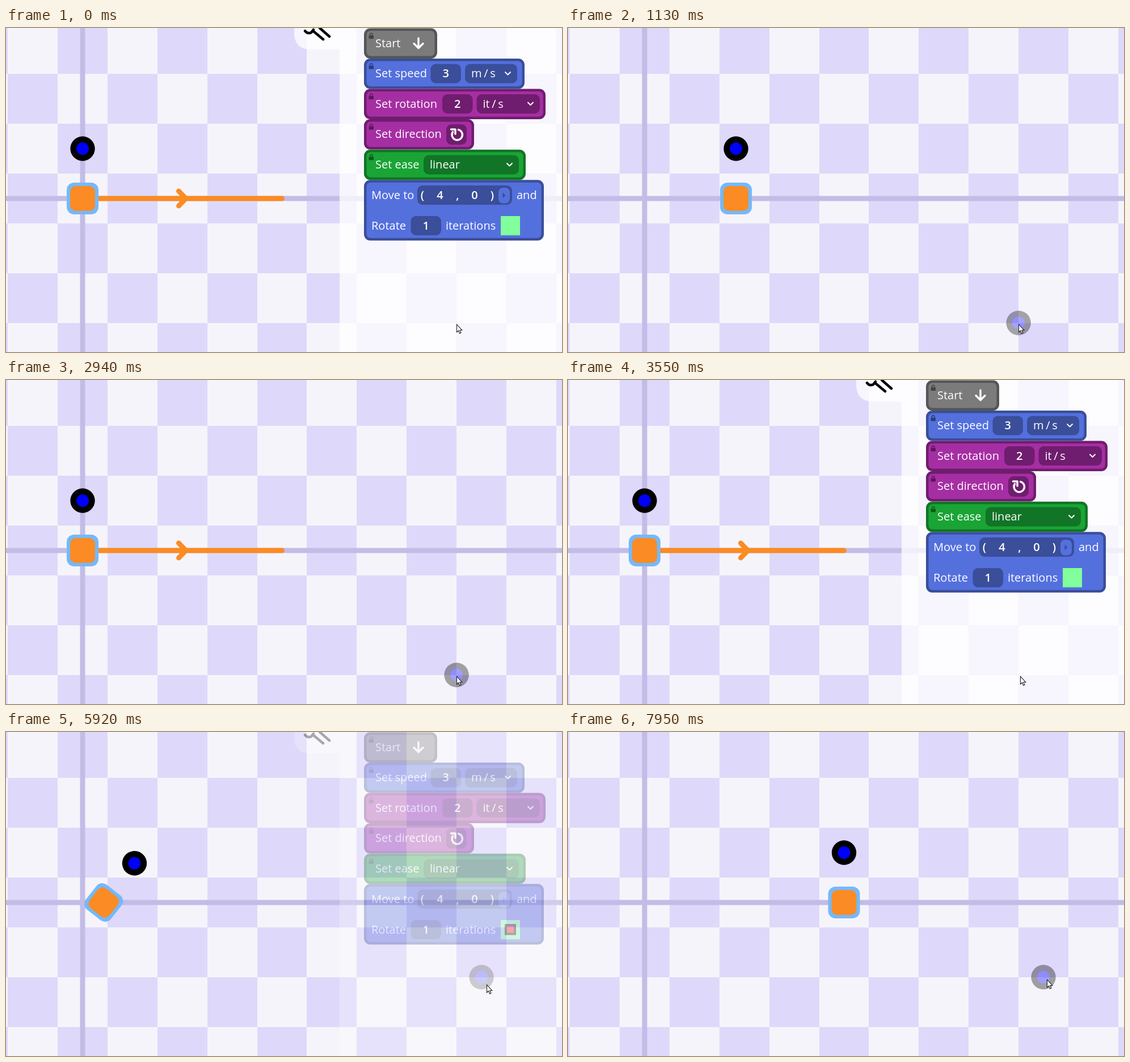
An HTML page for the animation above (8 s loop, 980 by 572 pixels).

```html
<!DOCTYPE html>
<html lang="en">
<head>
<meta charset="utf-8">
<title>Move and rotate</title>
<style>
  html, body { margin: 0; width: 100%; height: 100%; overflow: hidden; background: #f6f4fb; }
  svg { display: block; width: 980px; height: 572px; }
  text { font: 500 20px "Open Sans", "Noto Sans", sans-serif; fill: #fff; white-space: pre; }
  .num { font-weight: 600; text-anchor: middle; }
  .unit { word-spacing: -1.5px; }
  .line { fill: none; stroke: #fff; stroke-linecap: round; stroke-linejoin: round; }
</style>
</head>
<body>
<svg id="stage" viewBox="0 0 980 572">
  <g id="grid" shape-rendering="crispEdges"></g>
  <path d="M135 0V572M0 301H980" stroke="#c2bde6" stroke-width="9"/>
  <g id="arrow" class="line" style="stroke:#fb8b24" stroke-width="9">
    <path d="M135 301H486.5M304.5 288L317 301L304.5 314"/>
  </g>
  <g id="body">
    <rect x="-28" y="-28" width="56" height="56" rx="13" fill="#74b9fb"/>
    <rect x="-22" y="-22" width="44" height="44" rx="10" fill="#fb8b24"/>
    <g id="dot" transform="translate(0 -88)">
      <circle r="21.7" fill="#000"/>
      <circle r="11" fill="#00f"/>
    </g>
  </g>
  <g id="ghost">
    <circle r="21.7" fill="#000"/>
    <circle r="11" fill="#00f"/>
  </g>
  <g id="panel">
    <path d="M508 0H588V38H534Q508 36 508 8Z" fill="#fff" fill-opacity=".75"/>
    <rect x="588" width="392" height="572" fill="#fff" fill-opacity=".75"/>
    <path class="line" style="stroke:#000" stroke-width="4.5"
      d="M527 5Q531 11 538 8L542 3M541 5L559 20M553 0L570 15"/>
    <g id="blocks"></g>
    <g id="mark">
      <rect x="879" y="339" width="20" height="19.5" fill="#000"/>
      <rect x="883" y="343" width="12" height="11.5" fill="#f00"/>
    </g>
  </g>
  <path id="cursor" d="M.5 .5V14L3.5 11.3L5.6 16.3L7.9 15.3L5.8 10.5H9.8Z" fill="#fff" stroke="#222" stroke-width="1.1"/>
</svg>
<script>
const NS = 'http://www.w3.org/2000/svg';
const LOOP = 8000, CELL = 87.88, OX = 135, OY = 301;
const $ = id => document.getElementById(id);

function add(parent, tag, attrs, label) {
  const el = document.createElementNS(NS, tag);
  for (const k in attrs) el.setAttribute(k, attrs[k]);
  if (label) el.textContent = label;
  return parent.appendChild(el);
}

// Checkerboard centred on the origin cell
for (let i = -2; i <= 10; i++)
  for (let j = -4; j <= 4; j++)
    if ((i + j) & 1)
      add($('grid'), 'rect', {
        x: OX + (i - .5) * CELL, y: OY + (j - .5) * CELL,
        width: CELL, height: CELL, fill: '#ded9fa'
      });

// Code blocks
const blocks = $('blocks');
const GREY = ['#7b7b7b', '#555555'], BLUE = ['#5470dd', '#3a4e99'],
      PINK = ['#a62ea3', '#6f1d6e'], GREEN = ['#1aa435', '#117426'];

const text = (x, y, s, cls = '') => add(blocks, 'text', { x, y, class: cls }, s);
const stroke = (d, w) => add(blocks, 'path', { d, class: 'line', 'stroke-width': w });
const box = (x, y, width, height, rx, fill) =>
  add(blocks, 'rect', { x, y, width, height, rx, fill });

function block(y, w, h, [fill, edge]) {
  box(631, y, w, h, 11, edge);
  box(635.5, y + 4.5, w - 9, h - 9, 7, fill);
}

function lock(y) {
  const g = add(blocks, 'g', { opacity: .45 });
  add(g, 'rect', { x: 639.5, y: y + 4.5, width: 8.5, height: 6, rx: 1, fill: '#000' });
  add(g, 'path', {
    d: `M641.5 ${y + 5}v-2a2.2 2.2 0 0 1 4.5 0v2`,
    fill: 'none', stroke: '#000', 'stroke-width': 1.4
  });
}

function row(y, w, colors, label) {
  block(y, w, 53.5, colors);
  lock(y + 8);
  text(651, y + 33, label);
}

const field = (x, y, w, colors) => box(x, y, w, 34, 9, colors[1]);

function number(x, y, s, colors) {
  field(x, y, 53.5, colors);
  text(x + 26.7, y + 23.5, s, 'num');
}

function select(x, y, w, s, colors, pad = 11) {
  field(x, y, w, colors);
  text(x + pad, y + 23.5, s, 'unit');
  stroke(`M${x + w - 21} ${y + 14.5}l4.5 4.5l4.5 -4.5`, 2);
}

row(.5, 129, GREY, 'Start');
stroke('M727 18V35M719 27.5L727 35.5L735 27.5', 3.4);

row(54, 283, BLUE, 'Set speed');
number(748.5, 63.5, '3', BLUE);
select(809, 63.5, 92, 'm / s', BLUE);

row(107.5, 320, PINK, 'Set rotation');
number(769, 117, '2', PINK);
select(829.5, 117, 111.5, 'it / s', PINK);

row(161, 194, PINK, 'Set direction');
box(776, 170, 36, 36, 9, PINK[1]);
stroke('M797.5 179.6A9.2 9.2 0 1 1 787.5 183.5M784.5 179H792V187', 3.4);

row(214.7, 285, GREEN, 'Set ease');
select(736, 224.5, 168, 'linear', GREEN);

block(268.3, 317, 107, BLUE);
text(644, 302, 'Move to');
field(725, 278, 167, BLUE);
[[734, '('], [765, '4'], [796, ','], [826, '0'], [857, ')']]
  .forEach(([x, s]) => text(x, 302, s, 'num'));
box(868, 282, 20, 27.5, 8, '#5470dd');
add(blocks, 'path', { d: 'M875.5 290.5L880.5 295.5L875.5 300.5Z', fill: BLUE[1] });
text(900, 302, 'and');
text(644, 355.7, 'Rotate');
number(713.5, 332, '1', BLUE);
text(775, 355.7, 'iterations');
add(blocks, 'rect', { x: 872, y: 332, width: 34, height: 34, fill: '#80ff9c' });

// Timeline: [time, value...] rows, interpolated linearly or eased
const FADE = [[500, 1], [710, 0], [2980, 0], [3220, 1], [5770, 1], [5990, 0]];
const POINTER = [
  [3000, 794, 523], [3200, 797, 523], [3550, 797, 523], [4330, 892, 356], [4820, 891, 348],
  [5040, 891, 348], [5400, 869, 428], [5720, 847, 446], [6800, 847, 446], [7500, 844, 437]
];
const RUNS = [
  { start: 520, reset: 2900, turn: 0 },
  { start: 5780, reset: LOOP, turn: 360 }
];
const TRAVEL = 4, SPEED = 3;

const smooth = p => p * p * (3 - 2 * p);

function sample(rows, t, ease = p => p) {
  if (t <= rows[0][0]) return rows[0].slice(1);
  for (let i = 1; i < rows.length; i++) {
    const a = rows[i - 1], b = rows[i];
    if (t < b[0]) {
      const p = ease((t - a[0]) / (b[0] - a[0]));
      return a.slice(1).map((v, k) => v + (b[k + 1] - v) * p);
    }
  }
  return rows[rows.length - 1].slice(1);
}

const place = (id, x, y, turn = 0) =>
  $(id).setAttribute('transform', `translate(${x} ${y}) rotate(${turn})`);
const show = (id, alpha) => $(id).setAttribute('opacity', alpha);
const snap = v => Math.round(v * 2 / CELL) * CELL / 2;

function draw(t) {
  const run = RUNS.find(r => t >= r.start - 20 && t < r.reset);
  const p = run ? Math.min(1, Math.max(0, (t - run.start) / 1000 * SPEED / TRAVEL)) : 0;
  place('body', OX + p * TRAVEL * CELL, OY, run ? p * run.turn : 0);
  show('arrow', run ? 0 : 1);

  const [panel] = sample(FADE, t);
  show('panel', panel);
  show('mark', t >= 4600 ? 1 : 0);

  const [x, y] = sample(POINTER, t, smooth);
  place('cursor', x, y);
  $('cursor').setAttribute('stroke', t >= 5350 && t < 5440 ? '#a39fc8' : '#222');
  place('ghost', OX + snap(x - OX), OY + snap(y - OY));
  show('ghost', (1 - panel) * (.3 + .05 * Math.cos(t * Math.PI / 500)));
}

const began = performance.now();
function tick() {
  draw((performance.now() - began) % LOOP);
  requestAnimationFrame(tick);
}
tick();
</script>
</body>
</html>
```
